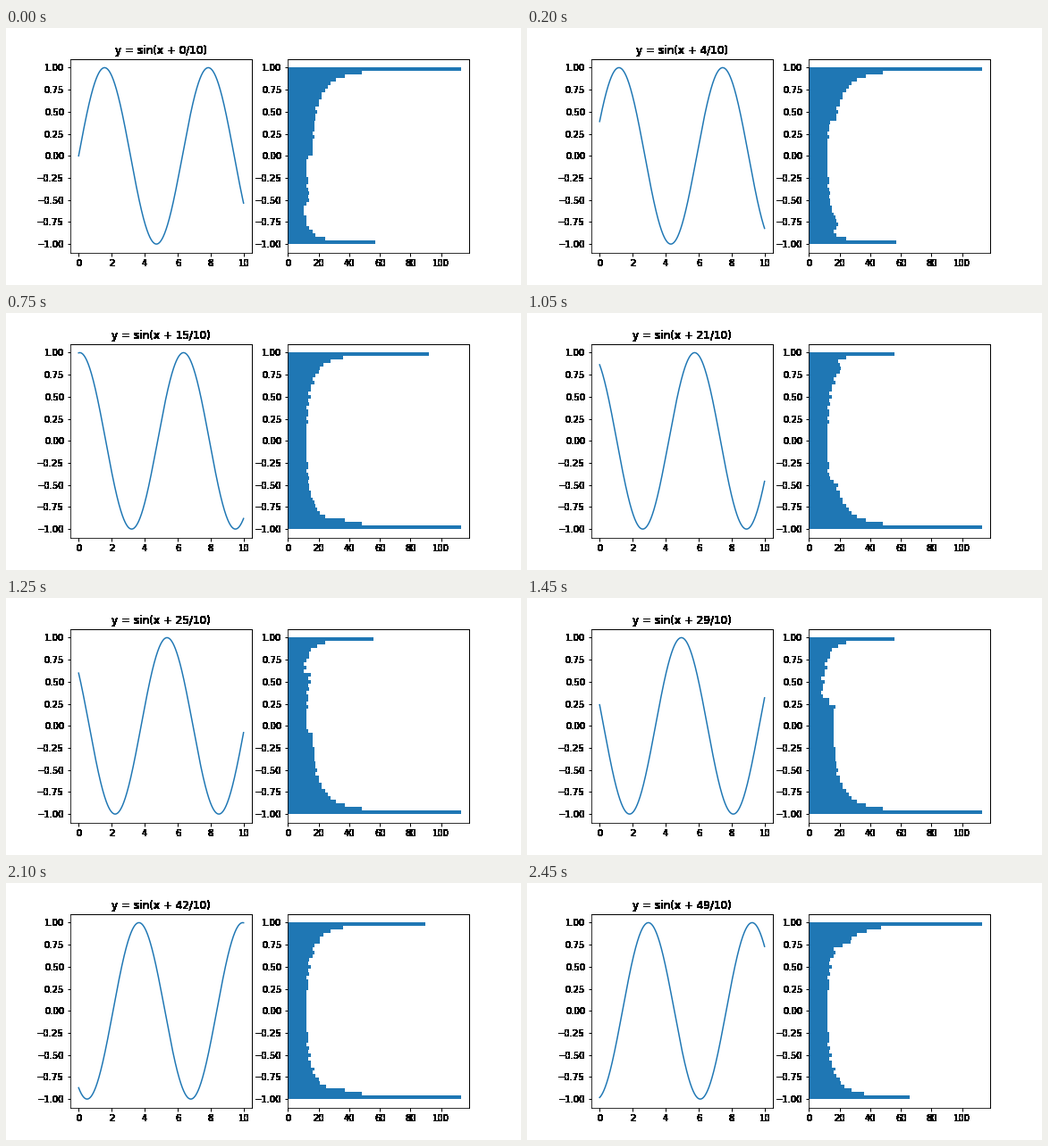
Animation of 576 by 288 pixels, one loop 2.5 s. Source, as a matplotlib script:

```python
import matplotlib.pyplot as plt
import numpy as np
from matplotlib.animation import FuncAnimation

plt.rcParams.update({
    "font.family": "DejaVu Sans",
    "font.size": 10,
    "figure.subplot.bottom": 0.125,
    "xtick.major.width": 1,
    "ytick.major.width": 1,
})

FRAMES = 50
INTERVAL = 50
BINS = 50
x = np.arange(0, 10, 0.01)


def harden(img, dpi):
    """Turn every touched pixel opaque, for jagged heavy text."""
    out = img.copy()
    out[..., 3] = out[..., 3] > 0
    return out, 0, 0


def style(ax, xticks):
    ax.set_xticks(xticks)
    ax.set_yticks(np.linspace(-1, 1, 9))
    for label in ax.get_xticklabels() + ax.get_yticklabels():
        label.set_agg_filter(harden)
    for side in ("top", "right"):
        ax.spines[side].set_linewidth(1)
    ax.autoscale(False)


def draw_hist(y):
    return ax_hist.hist(y, bins=BINS, orientation="horizontal", color="C0")[2]


fig, (ax_wave, ax_hist) = plt.subplots(1, 2, figsize=(8, 4), dpi=72)
line, = ax_wave.plot(x, np.sin(x))
title = ax_wave.set_title("", fontsize=12)
title.set_agg_filter(harden)
bars = draw_hist(np.sin(x))
style(ax_wave, range(0, 11, 2))
style(ax_hist, range(0, 101, 20))


def update(i):
    global bars
    y = np.sin(x + i / 10)
    line.set_ydata(y)
    title.set_text(f"y = sin(x + {i}/10)")
    bars.remove()
    bars = draw_hist(y)
    return line, title, *bars


anim = FuncAnimation(fig, update, frames=FRAMES, interval=INTERVAL,
                     init_func=lambda: [], repeat=True, repeat_delay=0)
plt.show()
```
